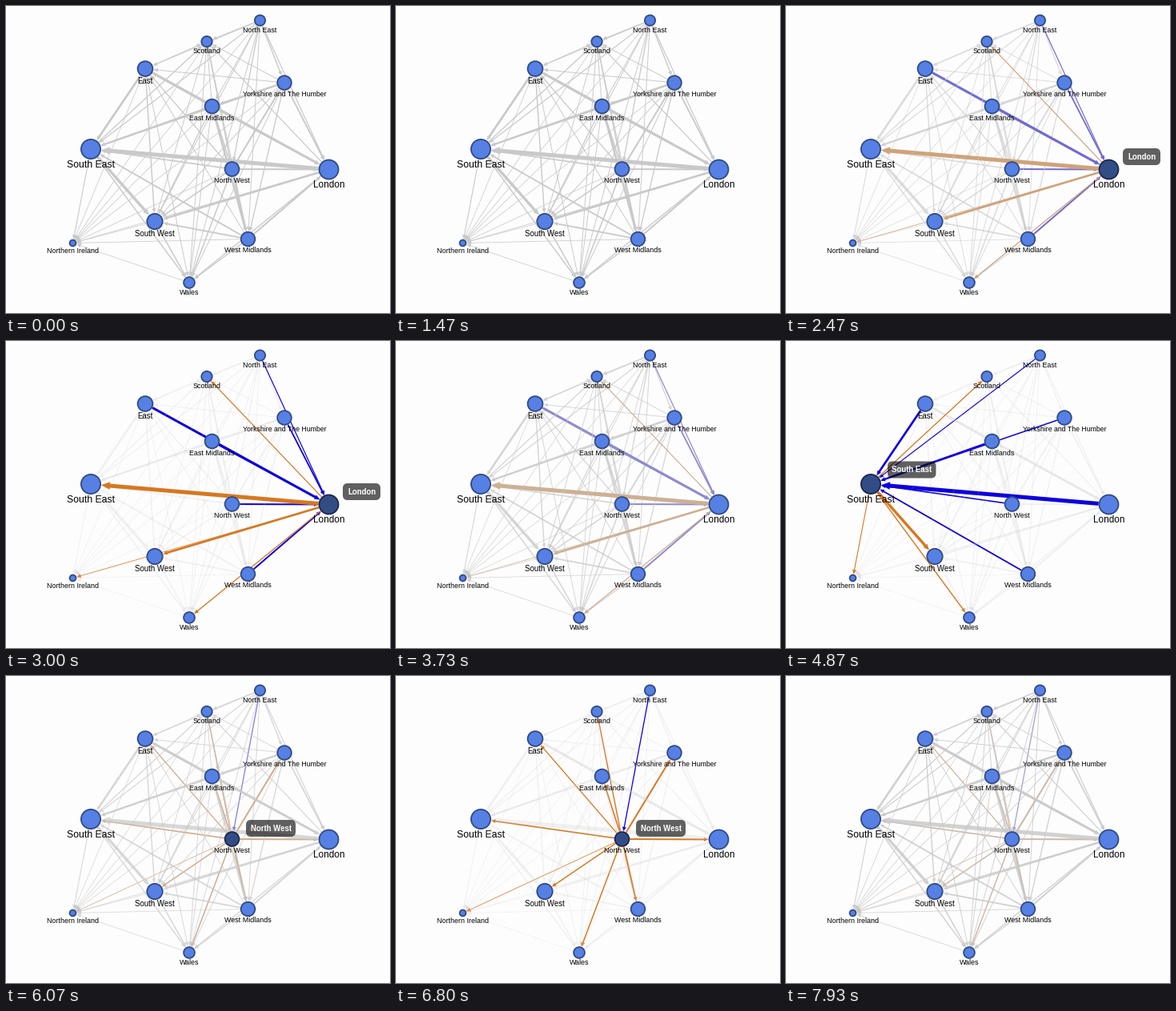
Recreate the animation shown at these times as a matplotlib script. Size 480x384 px, loop 8 s.

```python
from itertools import combinations

import numpy as np
import matplotlib.pyplot as plt
from matplotlib.animation import FuncAnimation
from matplotlib.collections import PolyCollection
from matplotlib.patches import Circle, FancyBboxPatch

W, H, DPI = 480, 384, 100
LOOP, STEP = 8000, 64
FADE = 600
PX = 72 / DPI

BG = "#fefdfe"
FILL, RIM = "#5680e3", "#2f4a86"
HOT_FILL, HOT_RIM = "#324d86", "#1b264d"
GREY = np.array([0.79, 0.79, 0.79])
BLUE = np.array([0.05, 0.0, 0.87])
ORANGE = np.array([0.84, 0.47, 0.12])

# Every region points to all the regions listed after it.
# key: (label, x, y, radius, font size)
NODES = {
    "NE": ("North East", 317.5, 18, 7.5, 8.9),
    "NW": ("North West", 282.5, 204, 9.8, 8.9),
    "YH": ("Yorkshire and The Humber", 348, 96, 9.7, 8.8),
    "EM": ("East Midlands", 257.5, 125.5, 9.8, 8.9),
    "WM": ("West Midlands", 302.5, 291.5, 9.7, 8.9),
    "EA": ("East", 174, 78.5, 10.3, 9.7),
    "LO": ("London", 403.5, 204.5, 12.9, 11.8),
    "SE": ("South East", 106, 179, 13, 12.2),
    "SW": ("South West", 186, 269.5, 10.6, 9.7),
    "WA": ("Wales", 229, 346, 7.8, 8.9),
    "SC": ("Scotland", 251, 44.5, 7.6, 8.9),
    "NI": ("Northern Ireland", 83.5, 296.5, 4.8, 8.9),
}

WIDTHS = {
    "LO-SE": 5, "SE-SW": 3.4, "EA-LO": 3, "EA-SE": 2.7, "LO-SW": 2.6,
    "EM-EA": 2.5, "EM-WM": 2.5, "EM-SE": 2.3, "YH-EM": 2.3, "EM-LO": 2.2,
    "NW-YH": 2, "NW-WM": 2, "NW-LO": 2, "WM-LO": 2, "YH-LO": 1.8,
    "WM-SE": 1.8, "WM-SW": 1.8, "NW-SE": 1.6, "NW-EM": 1.6, "NW-SW": 1.5,
    "NW-WA": 1.5, "SW-WA": 1.5, "YH-SE": 1.5, "EA-SW": 1.4, "NW-SC": 1.4,
    "SE-WA": 1.4, "NE-YH": 1.4, "NW-EA": 1.3, "NE-NW": 1.3, "NE-LO": 1.2,
    "NE-SE": 1.2, "SE-SC": 1.3, "LO-SC": 1.2, "LO-WA": 1.3, "NE-SC": 1.2,
    "WM-WA": 1.3, "YH-WM": 1.3, "EM-SW": 1.3, "SE-NI": 1.1,
}

# node, start and end of hover, tooltip box (x, y, width)
HOVERS = [
    ("LO", 2150, 3300, (421, 178, 47)),
    ("SE", 3850, 5300, (127, 150.5, 60.5)),
    ("NW", 5800, 7390, (300, 180, 62)),
]


def arrow(a, b, width):
    """Outline of a line from node a that ends in a triangle at node b."""
    p, q = np.array(NODES[a][1:3]), np.array(NODES[b][1:3])
    u = (q - p) / np.hypot(*(q - p))
    n = np.array([-u[1], u[0]])
    p, tip = p + u * NODES[a][3], q - u * NODES[b][3]
    size = max(5.6, 2.2 * width)
    base, half, wing = tip - u * size, n * width / 2, n * size * 0.44
    return [p + half, base + half, base + wing, tip,
            base - wing, base - half, p - half]


fig = plt.figure(figsize=(W / DPI, H / DPI), dpi=DPI, facecolor=BG)
ax = fig.add_axes([0, 0, 1, 1])
ax.set(xlim=(0, W), ylim=(H, 0))
ax.axis("off")
plt.rcParams["font.family"] = "Liberation Sans"

pairs = list(combinations(NODES, 2))
edges = PolyCollection(
    [arrow(a, b, WIDTHS.get(f"{a}-{b}", 0.75 if b == "NI" else 0.95))
     for a, b in pairs],
    edgecolors="none", zorder=1)
ax.add_collection(edges)

dots = {}
for key, (label, x, y, r, size) in NODES.items():
    dots[key] = ax.add_patch(Circle((x, y), r - 0.9, lw=1.8 * PX, zorder=3))
    ax.text(x, y + r + 0.81 * size, label, size=size * PX, color="black",
            ha="center", va="baseline", zorder=4)

tips = {}
for key, _, _, (x, y, w) in HOVERS:
    box = FancyBboxPatch((x, y), w, 21, boxstyle="round,pad=0,rounding_size=6",
                         fc=(0, 0, 0, 0.62), ec="none", zorder=5)
    ax.add_patch(box)
    text = ax.text(x + w / 2, y + 14, NODES[key][0], size=9.7 * PX,
                   weight="bold", color="white", ha="center",
                   va="baseline", zorder=6)
    tips[key] = (box, text)


def ramp(t, start):
    return min(max((t - start) / FADE, 0), 1)


def draw(i):
    t = i * STEP
    colors = np.tile([*GREY, 1.0], (len(pairs), 1))
    for key, start, end, _ in HOVERS:
        level = ramp(t, start) * (1 - ramp(t, end))
        active = start <= t < end
        dots[key].set(fc=HOT_FILL if active else FILL,
                      ec=HOT_RIM if active else RIM)
        for part in tips[key]:
            part.set_visible(active)
        for c, (a, b) in zip(colors, pairs):
            if key in (a, b):
                goal = ORANGE if a == key else BLUE
                c[:3] += (goal - c[:3]) * level
            else:
                c[3] *= 1 - 0.77 * level
    edges.set_facecolor(colors)
    return [edges]


for dot in dots.values():
    dot.set(fc=FILL, ec=RIM)

anim = FuncAnimation(fig, draw, frames=LOOP // STEP, interval=STEP,
                     init_func=lambda: draw(0), repeat=True, repeat_delay=0)
plt.show()
```
